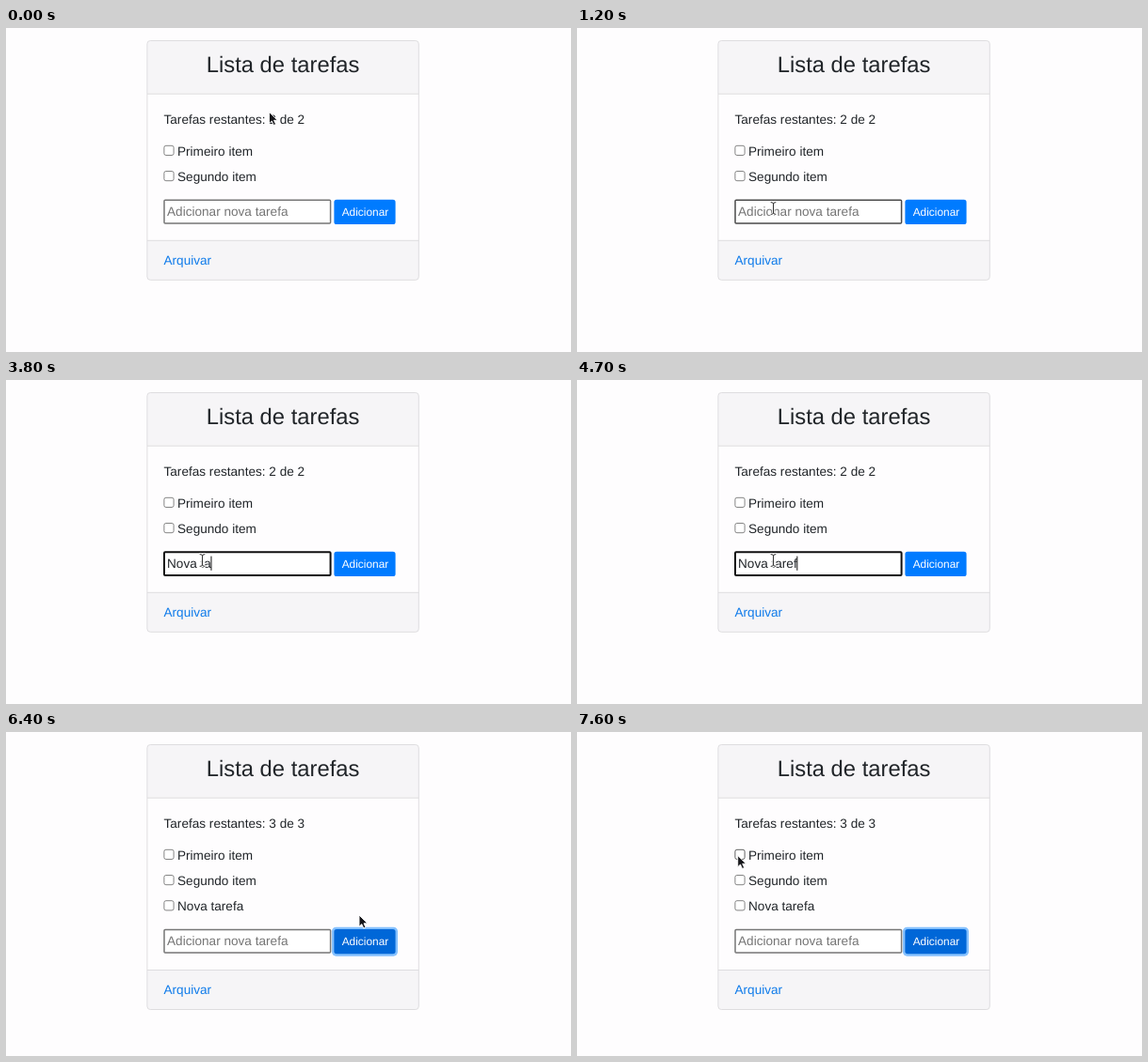
An HTML page for the animation above (8 s loop, 600 by 345 pixels).

```html
<!DOCTYPE html>
<html lang="pt">
<head>
<meta charset="utf-8">
<title>Lista de tarefas</title>
<style>
  html, body { margin: 0; width: 100%; height: 100%; overflow: hidden; background: #fefdfe; }
  svg { display: block; width: 600px; height: 345px; }
  text { font: 13.6px "Liberation Sans", Arial, sans-serif; fill: #212529; text-rendering: geometricPrecision; white-space: pre; }
  .title { font-size: 23.8px; text-anchor: middle; }
  .edge { stroke: #dcdbdd; stroke-width: .9; fill: none; }
  .band { fill: #f6f5f7; }
  .box { fill: #fff; stroke: #767676; stroke-width: .9; }
  .link { fill: #0f7bea; }
  #hint { fill: #757575; }
  #field { fill: #fff; stroke: #767676; stroke-width: 1.5; }
  #field.warm { stroke: #4a4a4a; }
  #field.focus { stroke: #101010; stroke-width: 2; }
  #button { fill: #007bff; }
  #button.dark { fill: #0067d8; }
  #ring { fill: #85c1ff; }
  .label { font-size: 11.9px; fill: #fff; }
</style>
</head>
<body>
<svg viewBox="0 0 600 345">
  <defs><clipPath id="clip"><rect id="clipBox" x="149.9" y="13.5" width="288.4" rx="3.4"/></clipPath></defs>
  <g clip-path="url(#clip)">
    <rect class="band" x="149" y="13" width="290" height="57"/>
    <rect class="band" id="footer" x="149" y="226.3" width="290" height="43"/>
  </g>
  <path class="edge" d="M150 70.2H438.3"/>
  <rect class="edge" id="card" x="149.9" y="13.5" width="288.4" rx="3.4"/>
  <text class="title" x="294.1" y="47">Lista de tarefas</text>
  <text id="count" x="167.5" y="102.2"></text>

  <rect class="box" id="first" x="167.9" y="125.3" width="10.2" height="10.2" rx="2"/>
  <text x="182" y="136.2">Primeiro item</text>
  <rect class="box" x="167.9" y="152.5" width="10.2" height="10.2" rx="2"/>
  <text x="182" y="163.3">Segundo item</text>
  <g id="added">
    <rect class="box" x="167.9" y="179.7" width="10.2" height="10.2" rx="2"/>
    <text x="182" y="190.4">Nova tarefa</text>
  </g>

  <g id="lower">
    <rect id="field" x="168" y="183.3" width="176.6" height="24.6" rx="1"/>
    <text id="hint" x="171" y="200">Adicionar nova tarefa</text>
    <text id="typed" x="171" y="200"></text>
    <rect id="caret" y="187.6" width="1" height="15.2" fill="#111"/>
    <rect id="ring" x="346" y="180.5" width="70" height="31" rx="4.6"/>
    <rect id="button" x="348.4" y="182.8" width="65.2" height="26.3" rx="2.7"/>
    <text class="label" x="356.7" y="200">Adicionar</text>
    <path class="edge" d="M150 226.3H438.3"/>
    <text class="link" x="167.5" y="251.6">Arquivar</text>
  </g>

  <g id="pointer">
    <path id="arrow" d="M0 0V12.2L2.8 9.6L4.8 14L7 13L5 8.8H8.8Z" fill="#16161a" stroke="#fff" stroke-width=".9"/>
    <g id="beam" fill="none" stroke-linecap="round">
      <path d="M-2.4-6.4Q0-6.4 0-5V5Q0 6.4-2.4 6.4M2.4-6.4Q0-6.4 0-5M0 5Q0 6.4 2.4 6.4" stroke="#fff" stroke-width="2.6"/>
      <path d="M-2.4-6.4Q0-6.4 0-5V5Q0 6.4-2.4 6.4M2.4-6.4Q0-6.4 0-5M0 5Q0 6.4 2.4 6.4" stroke="#333" stroke-width="1"/>
    </g>
    <path id="hand" d="M-1.3.6Q0-.8 1.3.6V5Q2.6 4.2 3.6 5.2Q4.9 4.5 5.9 5.6Q7.8 5.2 8 7V10.2Q7.8 11.8 7 13.8H.2Q-1.2 11.2-4-8.6L-4 8.6Q-4.4 7-2.6 7.2L-1.3 8.4Z" fill="#fff" stroke="#222" stroke-width="1" stroke-linejoin="round"/>
  </g>
</svg>
<script>
  const LOOP = 8000, STEP = 100, ROW = 27.2;
  const FOCUS = 1300, CLICK = 6100;
  const WORD = "Nova tarefa";
  const KEYS = [2400, 2800, 3000, 3200, 3300, 3600, 3800, 4000, 4300, 4700, 5200];
  // time, x, y of the pointer
  const PATH = [
    [0, 279.5, 89.5], [900, 222, 183], [1200, 208.5, 192], [5100, 208.5, 192],
    [5500, 357, 204], [6100, 357, 204], [6400, 375, 195], [6900, 345, 171],
    [7200, 258, 142], [7500, 171, 132], [7600, 170.7, 131.5]
  ];
  const el = {};
  document.querySelectorAll("[id]").forEach(e => el[e.id] = e);
  el.hand.setAttribute("d", "M-1.3.6Q0-.8 1.3.6V5Q2.6 4.2 3.6 5.2Q4.9 4.5 5.9 5.6Q7.8 5.2 8 7V10.2Q7.8 11.8 7 13.8H.2Q-1 11.4-4 8.8Q-4.4 7-2.6 7.2L-1.3 8.4Z");

  const show = (e, on) => e.style.display = on ? "" : "none";
  const set = (e, name, value) => e.setAttribute(name, value);
  const inside = ([x, y], l, t, r, b) => x >= l && x <= r && y >= t && y <= b;

  function pointerAt(t) {
    const i = PATH.findIndex(p => p[0] > t);
    if (i < 0) return PATH[PATH.length - 1].slice(1);
    const [t0, x0, y0] = PATH[i - 1], [t1, x1, y1] = PATH[i];
    const k = (t - t0) / (t1 - t0), s = k * k * (3 - 2 * k);
    return [x0 + (x1 - x0) * s, y0 + (y1 - y0) * s];
  }

  function draw(t) {
    const done = t >= CLICK, shift = done ? ROW : 0;
    const focused = t >= FOCUS && !done;
    const typed = done ? "" : WORD.slice(0, KEYS.filter(k => k <= t).length);
    const at = pointerAt(t);
    const overField = inside(at, 167, 182.5 + shift, 345, 208.5 + shift);
    const overButton = inside(at, 348, 182.5 + shift, 414, 209 + shift);

    el.count.textContent = done ? "Tarefas restantes: 3 de 3" : "Tarefas restantes: 2 de 2";
    show(el.added, done);
    set(el.lower, "transform", `translate(0 ${shift})`);
    set(el.footer, "y", 226.3 + shift);
    for (const e of [el.card, el.clipBox]) set(e, "height", 254.8 + shift);

    set(el.field, "class", focused ? "focus" : overField ? "warm" : "");
    show(el.hint, !typed);
    el.typed.textContent = typed;
    const width = typed ? el.typed.getComputedTextLength() : 0;
    set(el.caret, "x", 170.6 + width);
    show(el.caret, focused && (typed || t < 1900));

    set(el.button, "class", done || overButton ? "dark" : "");
    show(el.ring, done);
    el.ring.style.opacity = Math.min(1, (t - CLICK + STEP) / 200);
    el.first.style.stroke = inside(at, 167, 125, 179, 136) ? "#4f4f4f" : "";

    set(el.pointer, "transform", `translate(${at[0]} ${at[1]})`);
    show(el.beam, overField);
    show(el.hand, overButton);
    show(el.arrow, !overField && !overButton);
  }

  const start = performance.now();
  function tick() {
    const t = (performance.now() - start) % LOOP;
    draw(Math.floor(t / STEP) * STEP);
    requestAnimationFrame(tick);
  }
  tick();
</script>
</body>
</html>
```
